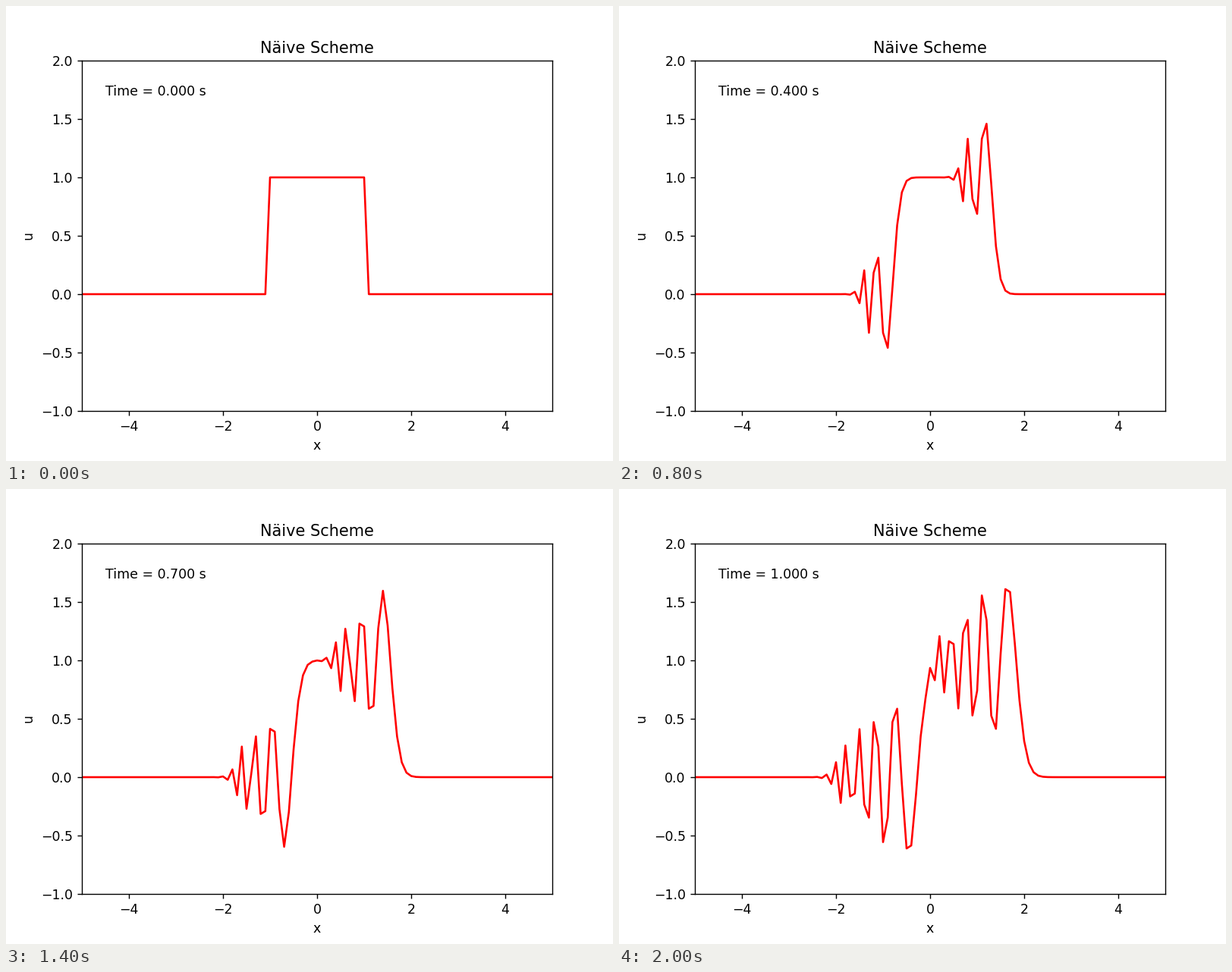
Animation, 800 px wide and 600 px high, one loop 2.05 s. Source, as a matplotlib script:

```python
import numpy as np
import matplotlib.pyplot as plt
from matplotlib.animation import FuncAnimation

STEPS = 41
DX, DT, SPEED = 0.1, 0.025, 1.0

x = np.linspace(-5, 5, 101)


def solve():
    """Forward in time, centred in space: unstable advection of a box."""
    half = 0.5 * SPEED * DT / DX
    u = np.where(np.abs(x) < 1 + DX / 2, 1.0, 0.0)
    history = [u]
    for _ in range(STEPS - 1):
        new = u.copy()
        new[1:-1] -= half * (u[2:] - u[:-2])
        u = new
        history.append(u)
    return history


waves = solve()

fig, ax = plt.subplots(figsize=(6.4, 4.8), dpi=125)
ax.set(xlim=(-5, 5), ylim=(-1, 2), xlabel="x", ylabel="u",
       title="Näive Scheme")
line, = ax.plot(x, waves[0], color="red")
clock = ax.text(-4.5, 1.7, "")


def update(i):
    line.set_ydata(waves[i])
    clock.set_text(f"Time = {i * DT:.3f} s")
    return line, clock


anim = FuncAnimation(fig, update, frames=STEPS, interval=50,
                     repeat=True, repeat_delay=0)
plt.show()
```
